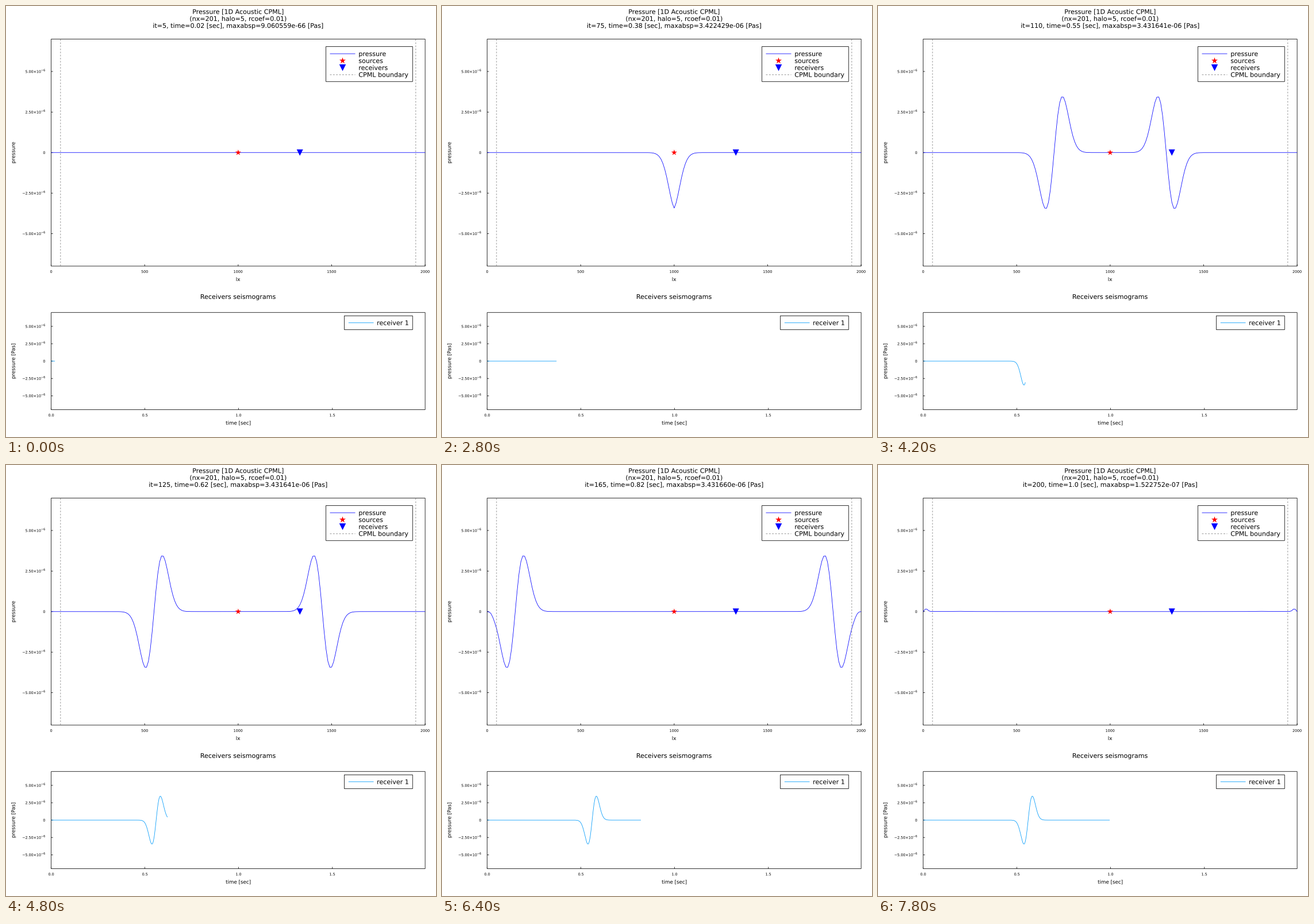
These frames come from a looping animation (748 px wide and 749 px high, 8000 ms). A matplotlib script:

```python
import numpy as np
import matplotlib.pyplot as plt
from matplotlib.animation import FuncAnimation
from matplotlib.patches import PathPatch, Polygon, Rectangle
from matplotlib.textpath import TextPath
from matplotlib.transforms import Affine2D

plt.rcParams["font.family"] = "DejaVu Sans"
plt.rcParams["path.snap"] = False

W, H, DPI = 748, 749, 64
PX = 72 / DPI  # points per pixel

# 1D acoustic wave model
NX, HALO, RCOEF = 201, 5, 0.01
DX, DT, VEL, FREQ, DELAY = 10.0, 0.005, 2000.0, 10.0, 0.4
SRC, REC = 100, 133
STEPS, STRIDE = 200, 5


def ricker(t):
    a = (np.pi * FREQ * (t - DELAY)) ** 2
    return (1 - 2 * a) * np.exp(-a)


def damping(x):
    """Recursive convolution coefficients of the absorbing layers."""
    size, end = HALO * DX, (NX - 1) * DX
    depth = np.maximum(np.maximum(size - x, x - end + size), 0) / size
    d = -3 * VEL * np.log(RCOEF) / (2 * size) * depth ** 2
    alpha = np.pi * FREQ * (1 - depth)
    b = np.exp(-(d + alpha) * DT)
    return d * (b - 1) / (d + alpha), b


def simulate():
    grid = np.arange(NX) * DX
    a, b = damping(grid[1:-1])
    ah, bh = damping(grid[:-1] + DX / 2)
    old, cur = np.zeros(NX), np.zeros(NX)
    psi, xi = np.zeros(NX - 1), np.zeros(NX - 2)
    states = []
    for n in range(STEPS):
        grad = np.diff(cur) / DX
        psi = bh * psi + ah * grad
        curve, dpsi = np.diff(grad) / DX, np.diff(psi) / DX
        xi = b * xi + a * (curve + dpsi)
        new = np.zeros(NX)
        new[1:-1] = (2 * cur - old)[1:-1] + (VEL * DT) ** 2 * (curve + dpsi + xi)
        new[SRC] += ricker(n * DT) * DT ** 2 / DX
        old, cur = cur, new
        states.append(cur)
    return grid, np.array(states)


grid, states = simulate()
times = np.arange(STEPS) * DT

# Stage in pixel coordinates, y pointing down
fig = plt.figure(figsize=(W / DPI, H / DPI), dpi=DPI, facecolor="white")
ax = fig.add_axes([0, 0, 1, 1])
ax.set(xlim=(0, W), ylim=(H, 0))
ax.axis("off")

LEFT, RIGHT = 78.6, 729.1
MID = (LEFT + RIGHT) / 2
YMAX = 7e-6
BIG, GUIDE, TICK, EXPO = 11.1, 8.72, 6.34, 5.1
BLUE, CYAN, THIN = "#0000ff", "#009afa", 0.8


class Panel:
    def __init__(self, top, bottom, xmax):
        self.top, self.bottom, self.xmax = top, bottom, xmax

    def x(self, v):
        return LEFT + np.asarray(v) / self.xmax * (RIGHT - LEFT)

    def y(self, v):
        half = (self.bottom - self.top) / 2
        return self.top + half - np.asarray(v) / YMAX * half


def glyphs(x, y, s, size, ha="center", angle=0):
    """Outline of a text, placed at subpixel precision on baseline y."""
    path = TextPath((0, 0), s, size=size)
    ink = path.get_extents()
    shift = {"left": 0, "center": (ink.x0 + ink.x1) / 2, "right": ink.x1}[ha]
    place = Affine2D().translate(-shift, 0).rotate_deg(angle)
    return path.transformed(place.scale(1, -1).translate(x, y))


def text(*args, **kw):
    patch = PathPatch(glyphs(*args, **kw), fc="black", lw=0, zorder=6)
    return ax.add_patch(patch)


def line(xs, ys, color="black", z=2, **kw):
    return ax.plot(xs, ys, color=color, lw=THIN * PX, zorder=z,
                   solid_capstyle="butt", **kw)[0]


def dashed(xs, ys, z):
    line(xs, ys, "#808080", z, dashes=(3.6, 3.1), dash_capstyle="butt")


def box(x0, y0, x1, y1, z):
    ax.add_patch(Rectangle((x0, y0), x1 - x0, y1 - y0, fc="white", ec="black",
                           lw=THIN * PX, zorder=z, joinstyle="miter"))


def shape(x, y, points, color):
    ax.add_patch(Polygon(points + [x, y], fc=color, lw=0, zorder=6))


def star(x, y, r):
    angle = np.arange(10) * np.pi / 5
    radius = np.where(np.arange(10) % 2, 0.382 * r, r)
    points = np.column_stack([radius * np.sin(angle), -radius * np.cos(angle)])
    shape(x, y, points, "red")


def triangle(x, y, r):
    shape(x, y, np.array([[-r, -r], [r, -r], [0, r]]), BLUE)


def draw_frame(panel, xticks, xlabel, ylabel):
    box(LEFT, panel.top, RIGHT, panel.bottom, 1)
    for v in xticks:
        x = panel.x(v)
        line([x, x], [panel.bottom, panel.bottom - 3])
        text(x, panel.bottom + 11.8, str(v), TICK)
    for v in (-5, -2.5, 0, 2.5, 5):
        y = panel.y(v * 1e-6)
        line([LEFT, LEFT + 3], [y, y])
        if v == 0:
            text(68, y + 2.4, "0", TICK, "right")
        else:
            mantissa = f"{v:.2f}×10".replace("-", "−")
            text(60.6, y + 2.4, mantissa, TICK, "right")
            text(68, y - 0.5, "−6", EXPO, "right")
    text(MID, panel.bottom + 26, xlabel, GUIDE)
    text(15.6, panel.y(0), ylabel, GUIDE, angle=90)


wave = Panel(57.5, 452.0, 2000)
trace = Panel(532.7, 701.5, 1.995)
draw_frame(wave, range(0, 2001, 500), "lx", "pressure")
draw_frame(trace, (0.0, 0.5, 1.0, 1.5), "time [sec]", "pressure [Pas]")

text(MID, 13.8, "Pressure [1D Acoustic CPML]", BIG)
text(MID, 25.9, f"(nx={NX}, halo={HALO}, rcoef={RCOEF})", BIG)
text(MID, 509, "Receivers seismograms", BIG)

for edge in (50, 1950):
    dashed([wave.x(edge)] * 2, [wave.bottom, wave.top], 3)
star(wave.x(grid[SRC]), wave.y(0), 5.3)
triangle(wave.x(grid[REC]), wave.y(0), 5.5)

# Legends
box(556.5, 70.5, 707.3, 131.3, 4)
rows = ("pressure", "sources", "receivers", "CPML boundary")
for i, label in enumerate(rows):
    text(613.3, 87 + 12.1 * i, label, BIG, "left")
line([563.5, 607.5], [83, 83], BLUE, 6)
star(585.5, 95.1, 5.8)
triangle(585.5, 107.2, 5.8)
dashed([563.5, 607.5], [119.4, 119.4], 6)

box(588.5, 538.4, 707.3, 562.5, 4)
line([595.8, 639.5], [550.5, 550.5], CYAN, 6)
text(645.1, 554.5, "receiver 1", BIG, "left")

status = text(MID, 38, "it", BIG)
pressure = line([], [], BLUE)
seismogram = line([], [], CYAN)


def update(k):
    it = STRIDE * (k + 1)
    p = states[it - 1]
    label = (f"it={it}, time={round(it * 0.5) / 100} [sec], "
             f"maxabsp={np.abs(p).max():.6e} [Pas]")
    status.set_path(glyphs(MID, 38, label, BIG))
    pressure.set_data(wave.x(grid), wave.y(p))
    seismogram.set_data(trace.x(times[:it]), trace.y(states[:it, REC]))
    return status, pressure, seismogram


anim = FuncAnimation(fig, update, frames=STEPS // STRIDE, interval=200,
                     init_func=lambda: update(0), repeat=True, repeat_delay=0)
plt.show()
```
